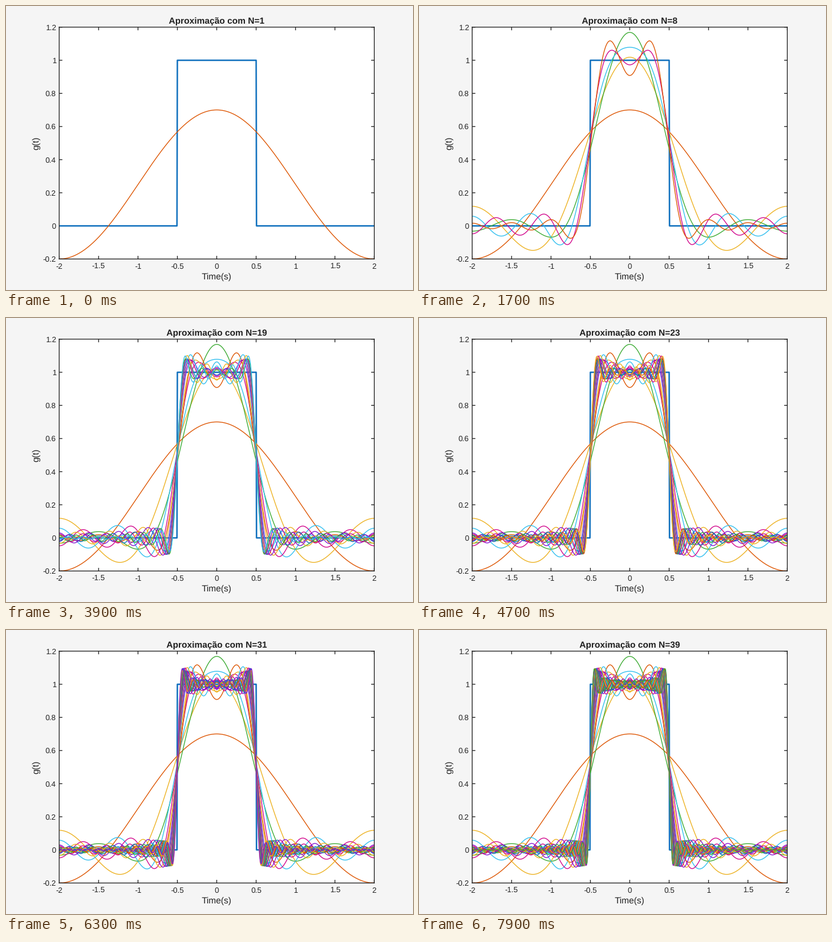
Write a matplotlib script that moves like this. It is 690 px wide and 482 px high and loops after 8000 ms.

```python
import numpy as np
import matplotlib.pyplot as plt
from matplotlib.animation import FuncAnimation

W, H, DPI = 690, 482, 64
LEFT, RIGHT, TOP, BOTTOM = 90.2, 624.4, 35.9, 429.4
INK = "#212121"
COLORS = ["#1171be", "#dd5400", "#edb120", "#8516d1",
          "#3baa32", "#2fbeef", "#d1048b"]
STEP_MS, FRAMES, N_MAX = 100, 80, 39
TICK = 5.3

plt.rcParams["font.family"] = "Liberation Sans"
plt.rcParams["text.hinting"] = "none"
plt.rcParams["text.hinting_factor"] = 1


def pt(px):
    return px * 72 / DPI


def label(x, y, text, size=13.33, ha="center", **kw):
    """Text with its baseline at pixel (x, y), y counted from the top."""
    return fig.text(x / W, 1 - y / H, text, fontsize=pt(size), color=INK,
                    ha=ha, va="baseline", **kw)


def tick(xs, ys):
    """Tick mark in axes fractions, drawn below the curves."""
    ax.plot(xs, ys, color=INK, lw=pt(1.33), transform=ax.transAxes,
            zorder=1, snap=False, solid_capstyle="butt")


fig = plt.figure(figsize=(W / DPI, H / DPI), dpi=DPI, facecolor="#f5f5f5")
ax = fig.add_axes([LEFT / W, 1 - BOTTOM / H,
                   (RIGHT - LEFT) / W, (BOTTOM - TOP) / H])
ax.set(xlim=(-2, 2), ylim=(-0.2, 1.2), xticks=[], yticks=[])
ax.set_autoscale_on(False)
for spine in ax.spines.values():
    spine.set(linewidth=pt(1.33), edgecolor=INK, snap=False)

dx, dy = TICK / (RIGHT - LEFT), TICK / (BOTTOM - TOP)
for v in np.linspace(-2, 2, 9):
    u = (v + 2) / 4
    tick([u, u], [0, dy])
    tick([u, u], [1, 1 - dy])
    label(LEFT + u * (RIGHT - LEFT), 446, f"{v:g}")
for i in range(-1, 7):
    u = (i + 1) / 7
    tick([0, dx], [u, u])
    tick([1, 1 - dx], [u, u])
    label(85, BOTTOM - u * (BOTTOM - TOP) + 4.8, f"{i / 5:g}", ha="right")

mid = (LEFT + RIGHT) / 2
label(mid, 464, "Time(s)", 14.67)
label(55, (TOP + BOTTOM) / 2, "g(t)", 14.67, rotation=90,
      rotation_mode="anchor")
title = label(mid, 30, "", 14.67, weight="bold")

# Rectangular pulse and its Fourier partial sums (period 4, width 1)
t = np.linspace(-2, 2, 801)
pulse = np.where(np.abs(t) <= 0.5 + 1e-9, 1.0, 0.0)
ax.plot(t, pulse, color=COLORS[0], lw=pt(2.5), solid_joinstyle="round")

curves = []
total = np.full_like(t, 0.25)
for n in range(1, N_MAX + 1):
    total = total + 2 / (n * np.pi) * np.sin(n * np.pi / 4) * np.cos(n * np.pi * t / 2)
    line, = ax.plot(t, total, color=COLORS[n % len(COLORS)], lw=pt(1.33))
    curves.append(line)


def update(k):
    count = 1 if k < 5 else 2 + (k - 5) // 2
    title.set_text(f"Aproximação com N={count}")
    for n, line in enumerate(curves, 1):
        # Every fourth term is zero, so that sum fully covers the one before
        covered = n % 4 == 3 and n < count
        line.set_visible(n <= count and not covered)
    return [title, *curves]


anim = FuncAnimation(fig, update, frames=FRAMES, init_func=lambda: update(0),
                     interval=STEP_MS, repeat=True, repeat_delay=0, blit=False)
plt.show()
```
